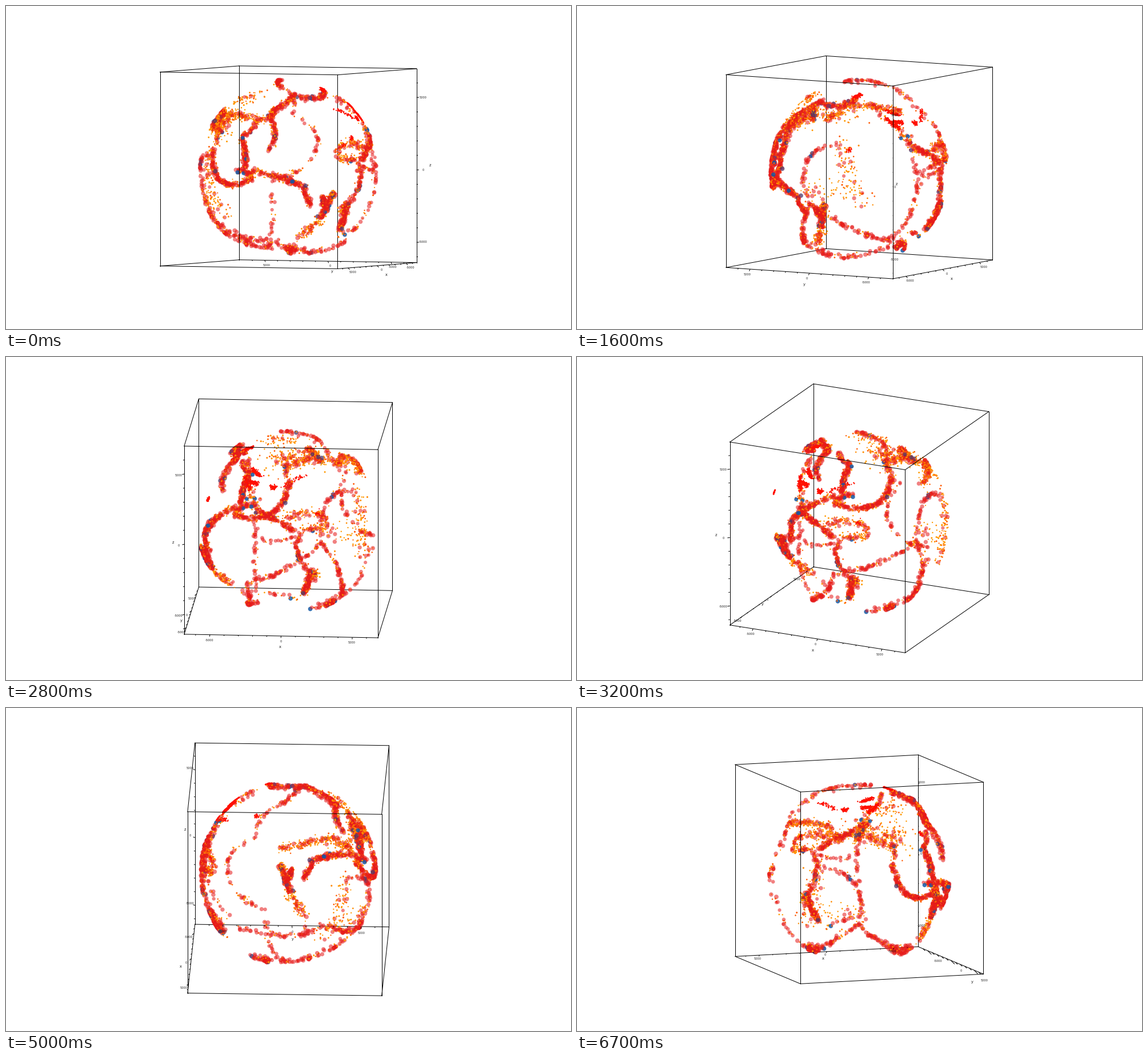
Write a matplotlib script that moves like this. It is 989 px wide and 566 px high and loops after 7.2 s.

```python
import itertools
from functools import partial

import numpy as np
import matplotlib.pyplot as plt
from matplotlib.animation import FuncAnimation
from matplotlib.collections import LineCollection

W, H, DPI = 989, 566, 100
FRAMES, STEP = 72, 100
CENTER = np.array([494.2, 282.7])
HALF = 170
SCALE = np.array([0.937, 0.907, 0.952])   # globe radius per axis, in half boxes
SHIFT = np.array([0, 0, -0.044])          # data origin inside the box
RADIUS = 6371
PX = 72 / DPI

# turning points of the drag: seconds, azimuth, elevation (degrees)
POSES = np.array([
    (0.3, 156, -2), (1.1, 188, 7.6), (1.6, 210.9, 6.5), (2.3, 248, 6.5),
    (2.7, 269, 12.8), (3.2, 295.5, 19.4), (4.1, 354.4, 3.1), (4.7, 362, 21),
    (5.8, 362.6, 20.2), (5.9, 378.4, 12), (6.7, 430.4, 8.6),
])
RESTS = ((4.7, 4.9), (5.0, 5.4), (5.6, 5.8))

# quakes per degree of arc, and scatter across it in degrees
KINDS = {
    "trench": (dict(big=2.6, small=2.4, strong=0.13), 0.85),
    "ridge": (dict(big=0.75, small=0.45, strong=0.01), 0.7),
    "zone": (dict(big=0.9, small=3.2, strong=0.05), 1.2),
    "wide": (dict(big=0.2, small=2.0), 3.0),
    "swarm": (dict(tiny=14), 0.9),
}
rng = np.random.default_rng(12)
quakes = {"small": [], "tiny": [], "big": [], "strong": []}


def belt(kind, start, end, bend=0, rate=1):
    """Scatter quakes along an arc that bulges to its left by bend * length."""
    (lon, lat), (dlon, dlat) = start, np.subtract(end, start)
    squeeze = np.cos(np.radians(lat + dlat / 2))
    length = np.hypot(dlon * squeeze, dlat)
    mix, spread = KINDS[kind]
    for name, density in mix.items():
        n = rng.poisson(density * rate * (length + 1))
        u = rng.random(n)
        bulge = 4 * bend * u * (1 - u)
        wide = spread * (1.4 if name == "small" else 0.9)
        la = lat + dlat * u + dlon * bulge + rng.normal(0, wide, n)
        la = np.radians(np.clip(la, -86, 86))
        lo = np.radians(lon + dlon * u - dlat * bulge
                        + rng.normal(0, wide, n) / np.cos(la))
        depth = 0 if name == "tiny" else 0.05 * rng.random(n) ** 3
        ball = np.stack([np.cos(la) * np.cos(lo), np.cos(la) * np.sin(lo),
                         np.sin(la)]) * (1 - depth)
        quakes[name].append(ball.T * SCALE + SHIFT)


trench, ridge, zone, wide, swarm = (partial(belt, kind) for kind in KINDS)

# western Pacific
trench((163, 55), (209, 60), -0.12)
trench((142, 41), (163, 56), -0.07)
trench((140, 34), (143, 41), rate=1.8)
trench((140, 35), (143, 12), 0.17, rate=0.8)
trench((131, 32), (121, 22), 0.1, rate=0.9)
trench((121, 21), (126, 1), 0.06, rate=1.4)
trench((119, -1), (131, -6), 0.15)
trench((131, -6), (122, -9))
trench((93, 14), (122, -9.5), -0.25)
trench((131, -1), (164, -11), 0.03, rate=1.1)
trench((165.5, -11), (171.5, -22.5), -0.08, rate=1.8)
trench((187.5, -15), (181.5, -31), rate=2.6)
trench((180, -18), (181.5, -24), rate=2.4)
zone((181, -31), (167, -45.5), 0.12, rate=1.5)
ridge((166, -46), (159, -60))

# eastern Pacific and the Americas
ridge((160, -62), (243, -49), -0.08)
ridge((243, -49), (251, 18), -0.07, rate=0.7)
ridge((249, -36), (284, -46), 0.05, rate=0.7)
ridge((257, 2), (278, 5), -0.08, rate=0.8)
ridge((226, 55), (236, 40), rate=1.5)
zone((244, 32), (254, 19))
trench((254, 19), (278, 8), 0.03)
trench((282, 7), (289, -19), -0.2, rate=0.7)
trench((289.5, -19), (286.5, -38), 0.04, rate=2)
zone((291, -20), (293, -24), rate=3)
zone((270, 16), (298.5, 17), 0.08, rate=0.8)
zone((298.5, 17), (298, 10), 0.2)
zone((298, 10), (282, 8), rate=0.8)

# Atlantic and Arctic
trench((333, -61), (330, -55.5), -0.8, rate=2)
ridge((330, -55), (300, -60))
ridge((330, -56), (360, -54), rate=0.6)
ridge((358, -54), (347, -8), 0.1, rate=0.7)
ridge((347, -5), (328, 3))
ridge((328, 3), (331, 42), 0.4, rate=0.9)
ridge((331, 42), (342, 66), 0.3, rate=0.6)
ridge((342, 66), (368, 78), rate=1.2)
ridge((368, 78), (485, 80), 0.04)

# Indian Ocean
ridge((362, -54), (430, -25), -0.08)
ridge((70, -25), (44, 12), -0.3)
ridge((70, -25), (138, -51), -0.12)
ridge((138, -51), (160, -62))

# Eurasia and Africa
zone((355, 36), (404, 39), 0.03)
zone((44, 39), (58, 27.5), rate=1.2)
zone((69, 30), (77, 42), rate=2.5)
zone((75, 34), (96, 26), -0.08)
zone((96, 26), (95, 17))
wide((85, 36), (103, 25), rate=1.7)
wide((88, 48), (120, 56))
wide((42, 12), (28, -26), 0.1)
wide((35, 32), (110, 35))
wide((38, -15), (75, -20), rate=0.4)

# dense local networks
swarm((205, 59), (213, 63), rate=1.8)
swarm((235.5, 40.5), (244, 33))
swarm((238, 47), (249, 43), rate=0.8)
swarm((241, 38), (249, 37), rate=0.8)
swarm((262.5, 36), (263, 35), rate=2.2)
swarm((270, 36), (289, 44), 0.05, rate=0.2)
swarm((204, 20), (205, 19), rate=0.7)
swarm((293, 18.5), (295, 18.5), rate=0.7)

# diameter range in pixels and possible colours
STYLES = {
    "small": ((2.0, 3.2), [(1, 0.60, 0, 1), (1, 0.55, 0, 1), (1, 0.36, 0.02, 1)]),
    "tiny": ((2.0, 2.8), [(1, 0.06, 0, 1)]),
    "big": ((6.0, 7.8), [(0.90, 0.10, 0.10, 0.55)]),
    "strong": ((6.8, 8.0), [(0.30, 0.22, 0.42, 0.75), (0.08, 0.35, 0.65, 0.85)]),
}


def layer(name):
    pts = np.concatenate(quakes[name])
    sizes, colors = STYLES[name]
    area = (rng.uniform(*sizes, len(pts)) * PX) ** 2
    return pts, area, np.array(colors)[rng.integers(0, len(colors), len(pts))]


points, areas, colors = (np.concatenate(c) for c in zip(*map(layer, quakes)))
order = rng.permutation(len(points))
points, areas, colors = points[order], areas[order], colors[order]

CORNERS = np.array(list(itertools.product((-1, 1), repeat=3)), float)
EDGES = [(a, b) for a, b in itertools.combinations(range(8), 2)
         if np.sum(CORNERS[a] != CORNERS[b]) == 1]

fig = plt.figure(figsize=(W / DPI, H / DPI), dpi=DPI, facecolor="white")
ax = fig.add_axes([0, 0, 1, 1])
ax.set_xlim(0, W)
ax.set_ylim(H, 0)
ax.axis("off")

dots = ax.scatter(points[:, 0], points[:, 1], s=areas, c=colors,
                  linewidths=0, zorder=3)
box = [ax.plot([], [], color="black", lw=PX)[0] for _ in EDGES]
ticks = LineCollection([], colors="black", linewidths=PX, zorder=4)
ax.add_collection(ticks)


def text(label, size):
    return ax.text(0, 0, label, fontsize=size, family="DejaVu Sans",
                   color="#1a1a1a", ha="center", va="center", zorder=5)


VALUES = (-5000, 0, 5000)
labels = [[text(str(v), 3.6) for v in VALUES] for _ in range(3)]
titles = [text(name, 4.8) for name in "xyz"]


def camera(t):
    for begin, end in RESTS:
        if begin <= t < end + 0.05:
            t = begin
    az, el = (np.radians(np.interp(t, POSES[:, 0], POSES[:, k])) for k in (1, 2))
    ca, sa, ce, se = np.cos(az), np.sin(az), np.cos(el), np.sin(el)
    basis = np.array([(-sa, ca, 0), (ca * se, sa * se, -ce)]).T
    return basis, np.array([ca * ce, sa * ce, se])


def outward(axis, toward):
    """Direction in which ticks and labels leave an axis."""
    if axis == 2:
        return np.array([-0.052, -0.052, 0])
    if axis == 0:
        return np.array([0, -0.052, -0.044])
    behind = toward[0] > 0 and toward[1] > 0
    return np.array([-0.052, 0, -0.052]) * (2.2 if behind else 1)


def draw(i):
    basis, toward = camera(i * STEP / 1000)

    def project(p):
        return CENTER + HALF * (p @ basis)

    dots.set_offsets(project(points))

    flat = project(CORNERS)
    far = np.argmin(CORNERS @ toward)
    for line, edge in zip(box, EDGES):
        line.set_data(*flat[list(edge)].T)
        line.set_zorder(2 if far in edge else 4)

    segments = []
    for axis in range(3):
        out = outward(axis, toward)
        along = np.eye(3)[axis]

        def spot(v):
            return along * (1 + v * SCALE / RADIUS + SHIFT) - 1

        for v in range(-6000, 7000, 1000):
            length = 0.2 if v % 5000 else 0.36
            segments.append(project(np.array([spot(v), spot(v) + out * length])))
        for label, v in zip(labels[axis], VALUES):
            label.set_position(project(spot(v) + out))
        titles[axis].set_position(project(along - 1 + 2.05 * out))
    ticks.set_segments(segments)
    return [dots, ticks, *box]


anim = FuncAnimation(fig, draw, frames=FRAMES, interval=STEP, repeat=True,
                     repeat_delay=0, blit=False)
plt.show()
```
